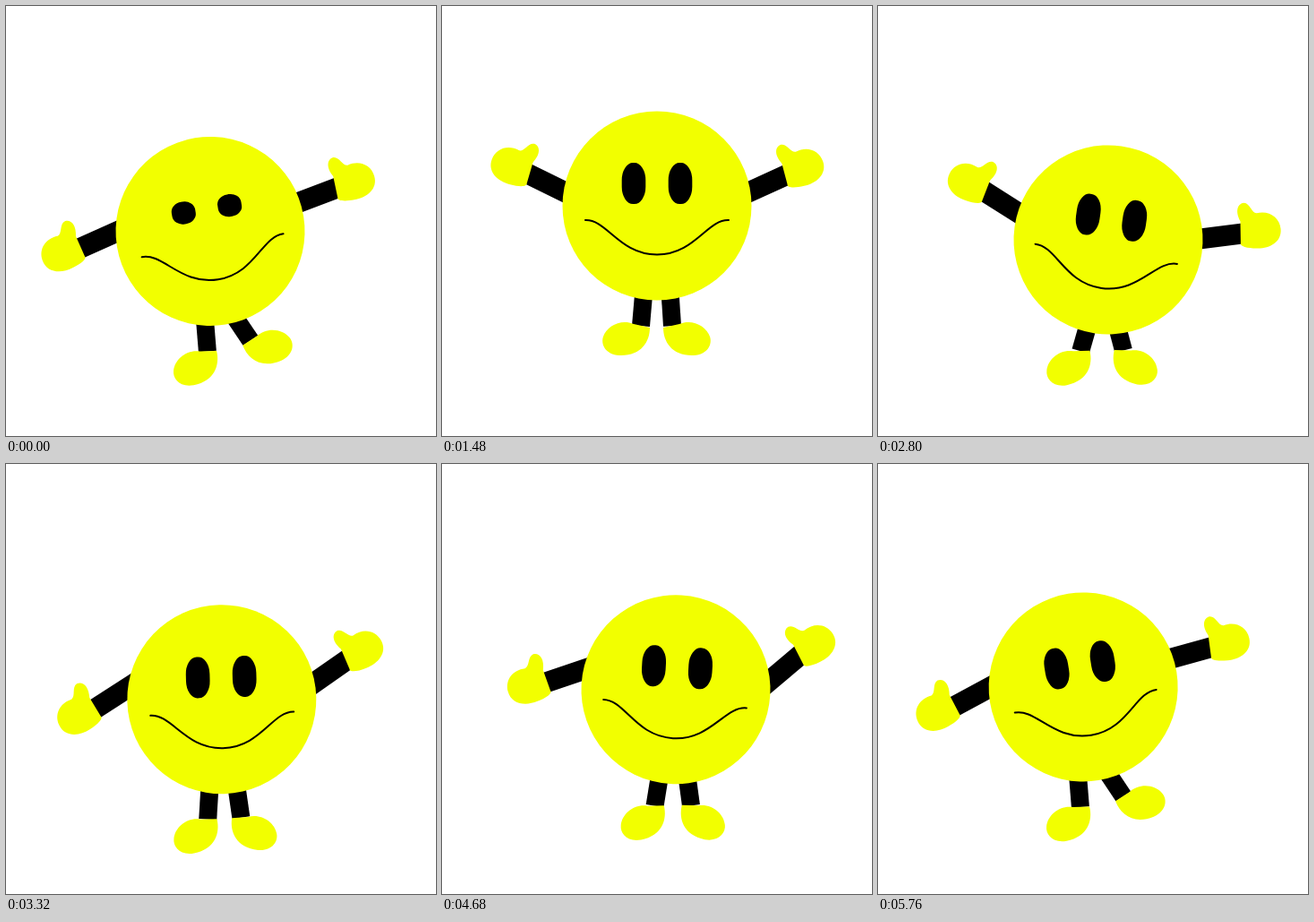
Animation, 480 px wide and 480 px high, one loop 5800 ms. Source, as an HTML page with a canvas:

```html
<!DOCTYPE html>
<html>
<head>
<meta charset="utf-8">
<style>
html, body { margin: 0; width: 100%; height: 100%; overflow: hidden; background: #fff; }
canvas { display: block; width: 480px; height: 480px; }
</style>
</head>
<body>
<canvas id="stage" width="480" height="480"></canvas>
<script>
const ctx = document.getElementById('stage').getContext('2d');
const LOOP = 5800, STEP = 40, YELLOW = '#f2ff00', BLACK = '#000';
const RAD = Math.PI / 180;

// Main poses of the dance: time, sideways place and lean of the head.
const SWAY = [
  [0, 228, -9.3], [920, 242, 1], [1480, 240, 0], [2800, 257, 8], [3400, 240, -2],
  [3840, 253.5, 1], [4680, 261, 3.4], [5200, 240, -4], [LOOP, 229, -9.3]
];
const BLINKS = [40, 3880];

const FOOT = new Path2D('M-10,2 C-10,18 0,34 24,33 C40,32 45,20 42,12 C38,0 22,-8 8,-2 Z');
const HAND = new Path2D('M1,-14 C-4,-26 0,-34 7,-34 C14,-33 14,-22 20,-21 ' +
  'C34,-23 45,-14 45,-1 C45,14 30,20 16,18 C6,17 -3,14 -1,10 Z');
const MOUTH = new Path2D('M-80,16 C-56,15 -42,54.5 0,54.5 C42,54.5 56,15 80,16');

const wave = (t, period, phase) => Math.cos(2 * Math.PI * (t / period - phase));

function sway(t) {
  const next = SWAY.findIndex(key => key[0] > t);
  const [t0, x0, lean0] = SWAY[next - 1], [t1, x1, lean1] = SWAY[next];
  const u = (t - t0) / (t1 - t0), s = u * u * (3 - 2 * u);
  return { x: x0 + (x1 - x0) * s, lean: lean0 + (lean1 - lean0) * s };
}

// Bobbing that grows through the loop and dies out just after its restart.
function bob(t) {
  const age = t < 263 ? t + LOOP : t;
  return 264 - 11 * (age / LOOP) ** 2.5 * (1 + wave(age - 5580, LOOP / 6, 0));
}

const jump = t => 169 + 6.17e-4 * (t - 1184) ** 2;

function eyeHeight(t) {
  const shut = Math.max(0, ...BLINKS.map(mid => 1 - Math.abs(t - mid) / 100));
  return 46 - 35 * shut;
}

// Arm angle in degrees, positive is down.
function swing(side, t) {
  return side < 0 ? 33 * wave(t, LOOP / 5, 0.88) : -9 - 32 * wave(t, LOOP / 4, 0.19);
}

// The left foot trails the lean; the right one kicks when the head leans left.
function footPose(side, lean, landed) {
  const kick = Math.max(0, -lean);
  return side < 0
    ? { x: -18 - 1.6 * lean, y: 134 - 1.2 * Math.max(0, lean), turn: -14 * landed }
    : { x: 17 + 3 * kick, y: 134 - 1.3 * Math.abs(lean), turn: 14 * landed - 3.7 * kick };
}

function spin(x, y, degrees) {
  const c = Math.cos(degrees * RAD), s = Math.sin(degrees * RAD);
  return [x * c - y * s, x * s + y * c];
}

function at(x, y, degrees, side, draw) {
  ctx.save();
  ctx.translate(x, y);
  ctx.rotate(degrees * RAD);
  ctx.scale(side, 1);
  draw();
  ctx.restore();
}

function fill(path, color) {
  ctx.fillStyle = color;
  ctx.fill(path);
}

function drawArm(side, t, lean) {
  const [x, y] = spin(side * 104, -16, lean), angle = swing(side, t);
  at(x, y, side * angle, side, () => {
    ctx.fillStyle = BLACK;
    ctx.fillRect(-14, -11.5, 60, 23);
    at(43, 0, -0.2 * angle, 1, () => fill(HAND, YELLOW));
  });
}

function drawLeg(side, lean, landed) {
  const { x, y, turn } = footPose(side, lean, landed);
  ctx.beginPath();
  ctx.moveTo(...spin(side * 14, 88, lean / 2));
  ctx.lineTo(x, y);
  ctx.strokeStyle = BLACK;
  ctx.lineWidth = 20;
  ctx.stroke();
  at(x, y, turn, side, () => fill(FOOT, YELLOW));
}

function drawFace(t) {
  const h = eyeHeight(t), head = new Path2D(), eyes = new Path2D();
  head.arc(0, 0, 105.5, 0, 2 * Math.PI);
  for (const x of [-26, 26]) {
    eyes.roundRect(x - 13.3, -25 - h / 2, 26.6, h, { x: 12.5, y: h * 0.42 });
  }
  fill(head, YELLOW);
  fill(eyes, BLACK);
  ctx.strokeStyle = BLACK;
  ctx.lineWidth = 2;
  ctx.lineCap = 'round';
  ctx.stroke(MOUTH);
}

function frame() {
  const t = Math.floor(performance.now() % LOOP / STEP) * STEP;
  const { x, lean } = sway(t);
  const ground = bob(t), y = Math.min(ground, jump(t));
  const landed = Math.max(0, 1 - (ground - y) / 30);
  ctx.fillStyle = '#fff';
  ctx.fillRect(0, 0, 480, 480);
  at(x, y, 0, 1, () => {
    for (const side of [-1, 1]) {
      drawLeg(side, lean, landed);
      drawArm(side, t, lean);
    }
    at(0, 0, lean, 1, () => drawFace(t));
  });
  requestAnimationFrame(frame);
}
frame();
</script>
</body>
</html>
```
